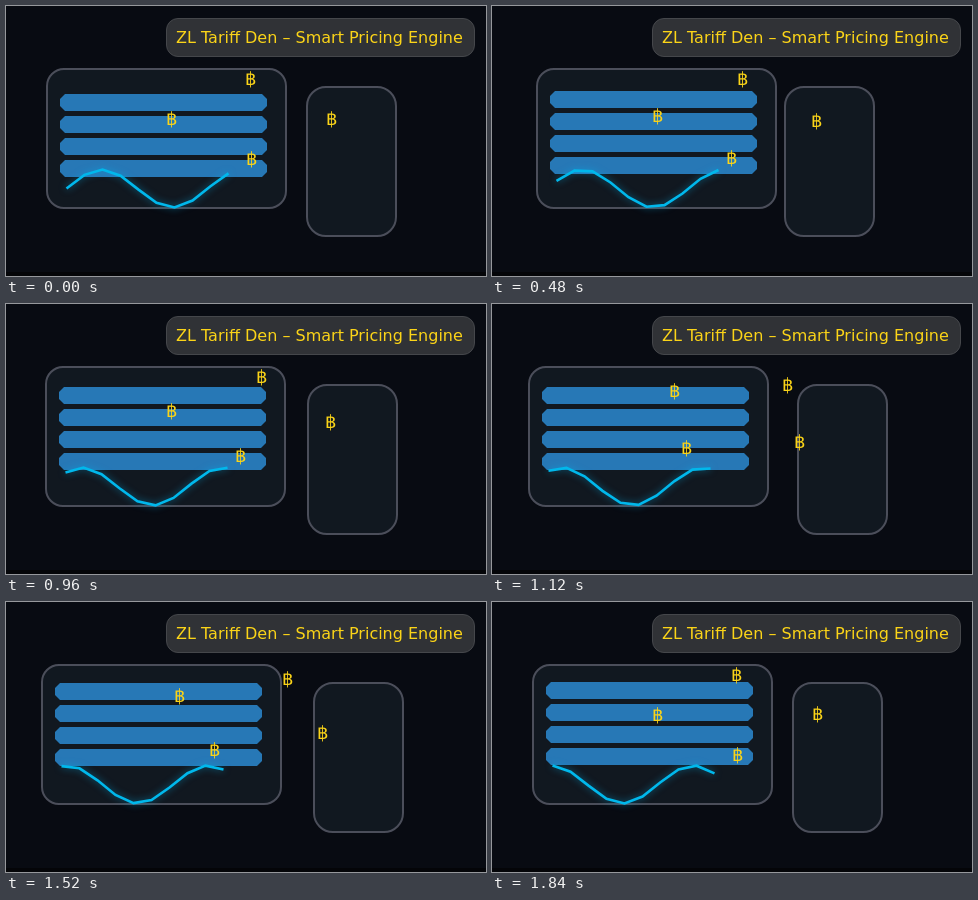
Recreate the animation shown at these times as an HTML page with a canvas. Size 480 px wide and 270 px high, loop 1920 ms.

```html
<!DOCTYPE html>
<html lang="en">
<head>
<meta charset="utf-8">
<title>Smart Pricing Engine</title>
<style>
html, body { margin: 0; width: 100%; height: 100%; overflow: hidden; background: #080b12; }
canvas { display: block; width: 480px; height: 270px; }
</style>
</head>
<body>
<canvas id="stage" width="480" height="270"></canvas>
<script>
const ctx = document.getElementById('stage').getContext('2d');
const TAU = Math.PI * 2;
const STEPS = 24, STEP_MS = 80;
const FONT = '"DejaVu Sans", Verdana, sans-serif';
const GOLD = '#fbd418';

function box(x, y, w, h, r, fill, line, width) {
  const d = width / 2;
  ctx.beginPath();
  ctx.roundRect(x + d, y + d, w - width, h - width, r - d);
  ctx.fillStyle = fill;
  ctx.fill();
  ctx.strokeStyle = line;
  ctx.lineWidth = width;
  ctx.stroke();
}

// Bar with cut corners
function bar(x, y, w, h, c) {
  ctx.beginPath();
  ctx.moveTo(x + c, y);
  ctx.lineTo(x + w - c, y);
  ctx.lineTo(x + w, y + c);
  ctx.lineTo(x + w, y + h - c);
  ctx.lineTo(x + w - c, y + h);
  ctx.lineTo(x + c, y + h);
  ctx.lineTo(x, y + h - c);
  ctx.lineTo(x, y + c);
  ctx.closePath();
  ctx.fillStyle = '#2778b6';
  ctx.fill();
}

function wave(x, phase) {
  ctx.save();
  ctx.beginPath();
  for (let i = 0; i < 10; i++) {
    ctx.lineTo(x + i * 18 + 0.5, 182.5 - 19 * Math.sin(i * 0.8 + phase));
  }
  ctx.shadowColor = 'rgba(0, 180, 240, 0.55)';
  ctx.shadowBlur = 7;
  ctx.strokeStyle = '#00b8ec';
  ctx.lineWidth = 2.6;
  ctx.stroke();
  ctx.restore();
}

function text(str, x, y, size) {
  ctx.font = size + 'px ' + FONT;
  ctx.fillStyle = GOLD;
  ctx.fillText(str, x, y);
}

function draw(step) {
  const p = step / (STEPS - 1);
  const sway = Math.sin(p * TAU);

  ctx.fillStyle = '#080b12';
  ctx.fillRect(0, 0, 480, 270);
  ctx.fillStyle = '#040508';
  ctx.fillRect(0, 266, 480, 4);

  const px = Math.floor(40 + 5 * sway);
  const qx = Math.floor(300 - 8 * sway);
  box(px, 62, 241, 141, 18, '#111820', '#4b4e5a', 2);
  box(qx, 80, 91, 151, 20, '#111820', '#4b4e5a', 2);

  const top = Math.floor(88 - 8 * p);
  for (let i = 0; i < 4; i++) bar(px + 14, top + i * 22, 207, 17, 5);
  wave(px + 20, 1.6 * p);

  box(160, 12, 309, 39, 12, '#303236', '#45474b', 1);
  text('ZL Tariff Den – Smart Pricing Engine', 170, 37, 16);

  for (let i = 0; i < 4; i++) {
    const a = p * TAU + i * Math.PI / 2;
    const x = Math.floor(240 + 80 * Math.cos(a));
    const y = Math.floor(119 + 40 * Math.sin(a));
    text('฿', x, y, 18);
  }
}

const start = performance.now();
function tick() {
  draw(Math.floor((performance.now() - start) / STEP_MS) % STEPS);
  requestAnimationFrame(tick);
}
tick();
</script>
</body>
</html>
```
